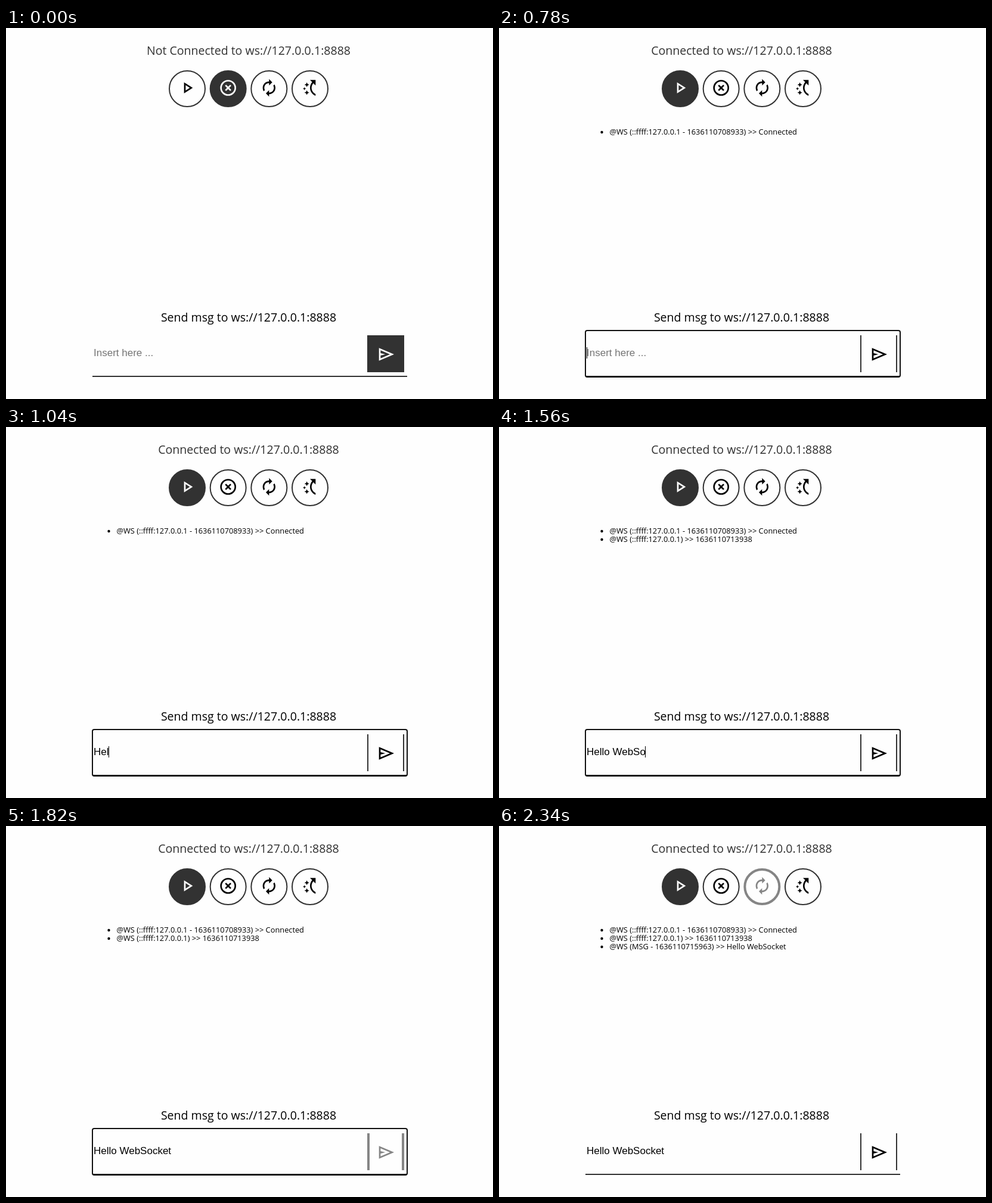
Animation of 817x623 px, one loop 2.6 s. Source, as an HTML page:

```html
<!DOCTYPE html>
<html lang="en">
<head>
<meta charset="utf-8">
<title>WebSocket client</title>
<style>
  html, body { margin: 0; width: 100%; height: 100%; overflow: hidden; background: #fefefe; }
  svg { display: block; width: 100%; height: 100%; --ink: #323232; --paper: #fefefe; }
  text { font-family: "Open Sans", "Noto Sans", sans-serif; white-space: pre; }
  .title { font-size: 19.55px; text-anchor: middle; }
  .log { font-size: 12.8px; font-variant-ligatures: none; }
  #field { font: 17px "Liberation Sans", Arial, sans-serif; }
  .frame { fill: var(--paper); stroke: var(--ink); stroke-width: 2; }
  .on .frame { fill: var(--ink); }
  .on .icon { fill: #fff; }
  .pressed .icon { fill: #858585; }
  .pressed .frame { stroke: #858585; stroke-width: 4; }
  .side { fill: var(--ink); }
  .pressed .side { fill: #858585; }
</style>
</head>
<body>
<svg viewBox="0 0 817 623">
  <text id="status" class="title" x="407" y="45" fill="#323232"></text>
  <g id="buttons"></g>
  <g id="logs"></g>
  <text class="title" x="407" y="493">Send msg to ws://127.0.0.1:8888</text>
  <rect x="145" y="584" width="528" height="2" fill="#323232"/>
  <rect id="ring" x="145" y="508" width="528" height="78" rx="3" fill="none" stroke="#101010" stroke-width="2"/>
  <text id="field" x="147" y="551"></text>
  <rect id="caret" y="536" width="1" height="19"/>
  <g id="send">
    <rect id="sendFill" x="606" y="516" width="62" height="62" fill="#323232"/>
    <rect class="side" id="left" x="606" y="516" height="62"/>
    <rect class="side" id="right" y="516" height="62"/>
    <path class="icon" transform="translate(637.7 548) scale(.033333) translate(-480 480)"
      d="M120-160v-640l760 320-760 320Zm80-120 474-200-474-200v140l240 60-240 60v140Z"/>
  </g>
</svg>
<script>
const LOOP = 2600;
const ADDRESS = "ws://127.0.0.1:8888";
const MESSAGE = "Hello WebSocket";
const CONNECT = 260, FOCUS = 780, PRESS = 1820, SENT = 2080, RECONNECT = 2340;

// [time, characters typed so far]
const TYPING = [[0, 0], [1040, 3], [1170, 5], [1300, 8], [1560, 11], [1690, 15]];

const LOGS = [
  [CONNECT, "@WS (::ffff:127.0.0.1 - 1636110708933) >> Connected"],
  [1560, "@WS (::ffff:127.0.0.1) >> 1636110713938"],
  [SENT, "@WS (MSG - 1636110715963) >> " + MESSAGE]
];

const ICONS = {
  play: "M8 5v14l11-7zM10 8.64 15.27 12 10 15.36z",
  stop: "M14.59 8 12 10.59 9.41 8 8 9.41 10.59 12 8 14.59 9.41 16 12 13.41 14.59 16 16 14.59 13.41 12 16 9.41zM12 2a10 10 0 1 0 0 20a10 10 0 1 0 0-20zm0 18a8 8 0 1 1 0-16a8 8 0 1 1 0 16z",
  renew: "M12 6v3l4-4-4-4v3c-4.42 0-8 3.58-8 8 0 1.57.46 3.03 1.24 4.26L6.7 14.8c-.45-.83-.7-1.79-.7-2.8 0-3.31 2.69-6 6-6zm6.76 1.74L17.3 9.2c.44.84.7 1.79.7 2.8 0 3.31-2.69 6-6 6v-3l-4 4 4 4v-3c4.42 0 8-3.58 8-8 0-1.57-.46-3.03-1.24-4.26z",
  shortcut: "M7.06 8.94 5 8l2.06-.94L8 5l.94 2.06L11 8l-2.06.94L8 11zM8 21l.94-2.06L11 18l-2.06-.94L8 15l-.94 2.06L5 18l2.06.94zM4.37 12.37 3 13l1.37.63L5 15l.63-1.37L7 13l-1.37-.63L5 11zM12 12c0-2.73 1.08-5.27 2.75-7.25L12 2h7v7l-2.82-2.82C14.84 7.82 14 9.88 14 12c0 3.32 2.1 6.36 5 7.82V22c-4.09-1.59-7-5.65-7-10z"
};

const $ = id => document.getElementById(id);
const show = (node, visible) => node.setAttribute("visibility", visible ? "visible" : "hidden");

$("buttons").innerHTML = Object.entries(ICONS).map(([name, path], i) => {
  const x = 304 + i * 68.67;
  return `<g id="${name}"><circle class="frame" cx="${x}" cy="102" r="30"/>
    <path class="icon" fill-rule="evenodd" d="${path}"
      transform="translate(${x} 100.5) scale(1.3333) translate(-12 -12)"/></g>`;
}).join("");

$("logs").innerHTML = LOGS.map(([, line], i) => {
  const y = 179 + i * 14;
  return `<g><circle cx="172.5" cy="${y - 4}" r="2.2"/>
    <text class="log" x="185.5" y="${y}">${line.replaceAll(">", "&gt;")}</text></g>`;
}).join("");
const logNodes = [...$("logs").children];

function setPressed(node, pressed) {
  node.classList.toggle("pressed", pressed);
  const circle = node.querySelector("circle");
  if (circle) circle.setAttribute("r", pressed ? 29 : 30);
}

function draw(t) {
  const connected = t >= CONNECT;
  const focused = t >= FOCUS && t < SENT;
  const sending = t >= PRESS && t < SENT;

  $("status").textContent = (connected ? "Connected to " : "Not Connected to ") + ADDRESS;
  $("play").classList.toggle("on", connected);
  $("stop").classList.toggle("on", !connected);
  setPressed($("renew"), t >= RECONNECT);
  logNodes.forEach((node, i) => show(node, t >= LOGS[i][0]));

  const typed = MESSAGE.slice(0, TYPING.findLast(([time]) => t >= time)[1]);
  const field = $("field");
  field.textContent = typed || "Insert here ...";
  field.setAttribute("fill", typed ? "#000" : "#757575");
  show($("ring"), focused);
  show($("caret"), focused && !sending);
  const width = typed ? field.getComputedTextLength() : 0;
  $("caret").setAttribute("x", Math.max(147, Math.floor(146.5 + width)));

  const border = sending ? 4 : 2;
  $("send").classList.toggle("on", !connected);
  setPressed($("send"), sending);
  show($("sendFill"), !connected);
  $("left").setAttribute("width", border);
  $("right").setAttribute("width", border);
  $("right").setAttribute("x", 668 - border);
}

const start = performance.now();
function tick() {
  draw((performance.now() - start) % LOOP);
  requestAnimationFrame(tick);
}
tick();
</script>
</body>
</html>
```
